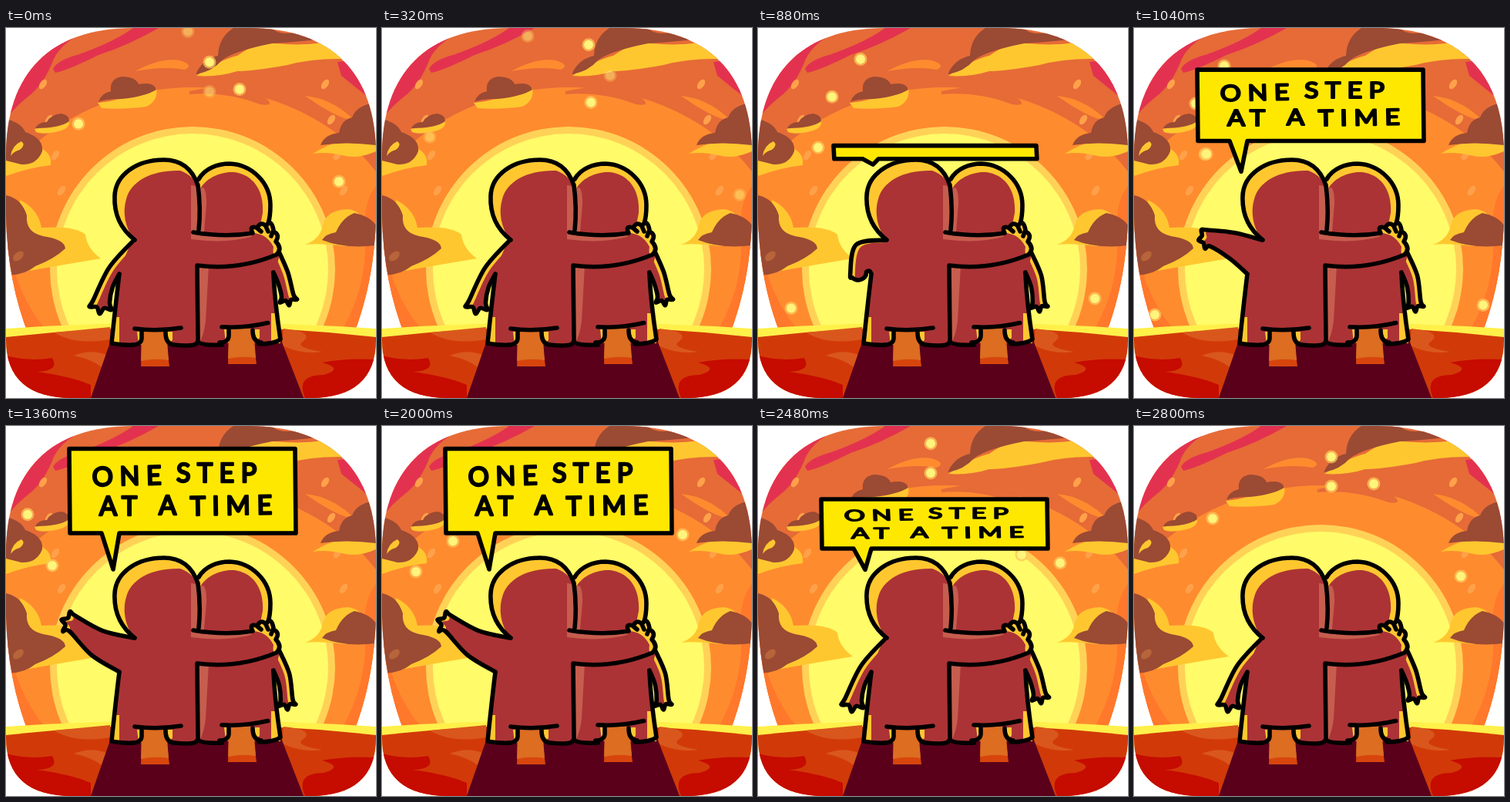
An HTML page that plays this animation: 480x480 px, repeating every 2.88 s.

```html
<!DOCTYPE html>
<html lang="en">
<head>
<meta charset="utf-8">
<title>One step at a time</title>
<style>
html, body { margin: 0; width: 100%; height: 100%; overflow: hidden; background: #fff; }
svg { display: block; width: 100vw; height: 100vh; }
.ink { fill: none; stroke: #000; stroke-width: 5.6; stroke-linecap: round; stroke-linejoin: round; }
.brown { fill: #9b4a33; }
.gold { fill: #ffc72f; }
.red { fill: #ab3335; }
.rose { fill: #c65d4e; }
.pink { fill: #e3324f; }
.coral { fill: #e66b37; }
.orange { fill: #ff8b2f; }
.seam { fill: none; stroke: #ab3335; stroke-width: 4; }
text { font: 34px Lato, "Open Sans", sans-serif; letter-spacing: 8.5px; stroke: #000; stroke-width: 2.6; stroke-linejoin: round; }
</style>
</head>
<body>
<svg viewBox="0 0 480 480">
  <defs>
    <clipPath id="dome"><path d="M0 165C0 58 58 0 165 0H315C422 0 480 58 480 165V245Q478 330 450 400H30Q2 330 0 245Z"/></clipPath>
    <clipPath id="floor"><path d="M0 370H480V405C480 455 450 480 395 480H85C30 480 0 455 0 405Z"/></clipPath>
  </defs>
  <g clip-path="url(#dome)">
    <path class="coral" d="M0 0H480V480H0Z"/>
    <ellipse class="orange" cx="242" cy="320" rx="285" ry="243"/>
    <path fill="#ff782b" d="M0 270Q12 345 52 392H0ZM480 205Q462 225 466 275Q468 335 436 392H480Z"/>
    <path class="pink" d="M0 0H112Q74 16 62 40Q50 72 30 88Q14 100 0 118ZM61 53Q66 42 95 34Q140 18 165 0H198Q160 22 120 35Q80 55 64 58ZM430 44Q455 40 480 60V98Q455 78 435 62Z"/>
    <path class="orange" d="M168 56Q200 38 225 42Q245 48 232 54Q205 49 168 56ZM388 88Q425 92 452 120Q430 118 388 88Z"/>
    <path class="coral" d="M238 82Q300 68 337 91Q350 102 330 99Q285 82 238 86Z"/>
    <g id="dots" fill="#ffa14a"></g>
    <circle cx="242" cy="313" r="185" fill="#ffd257"/>
    <circle cx="242" cy="313" r="176" fill="#fffb69"/>
    <g id="clouds">
      <path class="gold" d="M119 97Q150 94 195 78Q198 94 182 102Q150 106 124 104Z"/>
      <path class="brown" d="M120 96Q123 85 136 82Q134 66 150 63Q168 63 172 73Q192 69 195 80Q180 89 150 92Q128 92 120 96Z"/>
      <path class="gold" d="M37 131Q60 128 82 120Q84 130 68 134Q48 139 39 135Z"/>
      <path class="brown" d="M38 130Q42 122 53 122Q58 112 72 111Q82 113 82 121Q70 130 38 130Z"/>
      <path class="gold" d="M0 170Q30 170 47 157Q60 164 58 178Q30 181 0 192Z"/>
      <path class="brown" d="M0 118Q20 123 25 135Q49 143 47 160Q40 178 20 177L0 172Z"/>
      <path class="gold" d="M6 166Q8 152 20 147Q26 152 18 158Q10 160 6 166Z"/>
      <path class="gold" d="M18 223Q42 235 46 259Q90 256 103 268Q105 286 123 299Q75 307 24 316Z"/>
      <path class="brown" d="M0 217Q20 221 27 243Q25 265 48 270Q76 274 77 286Q62 300 38 309Q22 322 0 320Z"/>
      <ellipse cx="16" cy="296" rx="5" ry="8" transform="rotate(50 16 296)" fill="#b8643a"/>
      <path class="gold" d="M247 62Q280 40 300 36Q330 15 350 20Q400 25 445 12Q470 25 467 42Q410 36 365 48Q320 56 300 56Q275 64 247 62Z"/>
      <path class="brown" d="M247 58Q256 40 275 36Q276 12 295 0H345Q356 14 400 0L430 12Q380 18 345 20Q295 30 280 42Q268 56 247 60Z"/>
      <path class="gold" d="M398 163Q440 138 480 140V160Q455 171 436 165Q415 160 398 163Z"/>
      <path class="brown" d="M408 152Q413 138 432 136Q435 119 449 116Q454 101 480 96V152Q440 147 408 152Z"/>
      <path class="gold" d="M388 281Q408 274 411 255Q416 236 444 235Q462 238 464 253L440 283Q405 279 388 281Z"/>
      <path class="brown" d="M410 275Q415 267 428 265Q436 246 452 240Q472 244 480 256V282Q440 287 410 275Z"/>
    </g>
    <g id="stars"></g>
  </g>
  <g clip-path="url(#floor)">
    <path fill="#fff04a" d="M0 390Q240 374 480 390V480H0Z"/>
    <path fill="#d13a08" d="M0 401Q240 374 480 401V480H0Z"/>
    <path fill="#c60b00" d="M0 425Q30 433 60 428Q70 445 40 446Q85 452 110 463V480H0ZM480 430Q440 428 410 434Q440 442 412 450Q375 450 388 480H480Z"/>
    <path fill="#d9571d" d="M62 395Q90 412 135 404V388ZM360 390Q400 394 386 406Q372 414 410 420Q385 424 358 412ZM88 425Q110 416 130 424L124 440Q112 430 88 425Z"/>
    <path fill="#5a001b" d="M136 405L110 480H386L357 405Z"/>
  </g>
  <g id="right">
    <path class="gold" d="M250 198C258 182 275 176 290 176C318 177 343 200 343 230Q343 250 345 262L354 290L347 317L356 409H249Z"/>
    <path class="red" d="M252 208C262 192 282 186 296 187C320 190 335 210 333 240L330 255L354 290L347 317L350 370H344V409H249Z"/>
    <path class="rose" d="M252 208Q260 202 260 228L257 264H250ZM250 308H263L259 380Q256 402 250 409Z"/>
    <path class="ink" d="M250 196C258 182 275 176 290 176C318 177 343 200 343 230Q343 245 340 254M347 317Q348 350 356 404Q348 410 328 410"/>
  </g>
  <g id="armR"></g>
  <g id="left">
    <path class="gold" d="M166 275C148 260 140 240 141 218C142 190 170 171 205 171C228 171 242 184 251 206L249 411H138L147 319Z"/>
    <path class="red" d="M166 275C154 258 151 238 156 222C162 198 190 184 226 185Q246 192 250 212V411H147V375H141L147 319Z"/>
    <path class="rose" d="M240 204Q250 204 251 216L249 264H240Z"/>
    <path class="ink" d="M167 275C148 260 140 240 141 218C142 190 170 171 205 171C228 171 242 184 249 204Q253 235 250 262M147 319Q142 360 137 409Q155 412 166 411M218 411Q236 413 244 411Q250 409 249 402L248 309M250 408Q256 412 280 411"/>
  </g>
  <g id="legs"></g>
  <g id="hug">
    <path class="red" d="M235 265Q285 271 322 264L330 260L346 274L354 290Q300 315 236 308Z"/>
    <path class="rose" d="M240 263Q285 272 320 265L318 271Q285 280 240 274Z"/>
    <path class="gold" d="M319 266Q315 256 325 259Q330 251 337 256Q344 247 346 262Q356 268 351 277Q358 286 351 294Q345 296 347 284Q338 266 319 266Z"/>
    <path class="ink" d="M243 265Q285 272 320 266Q315 256 325 259L331 264M326 259Q331 250 337 257L340 264M338 256Q344 247 347 262L344 270M347 264Q356 268 350 277Q359 286 351 294Q301 315 248 308"/>
  </g>
  <g id="armL"></g>
  <g id="bubble">
    <path class="ink" style="fill:#ffe800" vector-effect="non-scaling-stroke" d="M82 29.500H375L376 139H147L139 186L124 139H83Z"/>
    <g id="words">
      <text x="112" y="78" transform="rotate(-1.500 112 78)">ONE</text>
      <text x="221" y="73">STEP</text>
      <text x="121" y="116">AT</text>
      <text x="198" y="115">A</text>
      <text x="239" y="116" transform="rotate(-1 239 116)">TIME</text>
    </g>
  </g>
</svg>
<script>
const STEP = 80, COUNT = 36;
const $ = id => document.getElementById(id);
const clamp = v => Math.max(0, Math.min(1, v));
const ease = t => (t = clamp(t), t * t * (3 - 2 * t));
const mix = (a, b, f) => a.map((v, i) => v + (b[i] - v) * f);

function add(parent, tag, attrs) {
  const el = document.createElementNS('http://www.w3.org/2000/svg', tag);
  for (const k in attrs) el.setAttribute(k, attrs[k]);
  return parent.appendChild(el);
}

// Smooth open curve through points
function curve(pts) {
  const at = i => pts[Math.max(0, Math.min(pts.length - 1, i))];
  let d = `M${pts[0]}`;
  for (let i = 0; i < pts.length - 1; i++) {
    const a = at(i - 1), b = at(i), c = at(i + 1), e = at(i + 2);
    d += `C${b[0] + (c[0] - a[0]) / 6} ${b[1] + (c[1] - a[1]) / 6} ` +
         `${c[0] - (e[0] - b[0]) / 6} ${c[1] - (e[1] - b[1]) / 6} ${c}`;
  }
  return d;
}

// Middle of a-b, pushed sideways by a share of its length
const bend = (a, b, k) => [(a[0] + b[0] - k * 2 * (b[1] - a[1])) / 2, (a[1] + b[1] + k * 2 * (b[0] - a[0])) / 2];

// Outline from shoulder around three fingers to the armpit
function armPoints(top, pit, side, palm, [x, y, deg, bow, finger]) {
  const hand = [];
  for (let i = 0; i <= 6; i++) {
    const a = (deg + side * (80 - i * 80 / 3)) * Math.PI / 180;
    const r = palm + (i % 2 ? finger : 0);
    hand.push([x + r * Math.cos(a), y + r * Math.sin(a)]);
  }
  return [top, bend(top, hand[0], bow * side), ...hand, bend(hand[6], pit, -bow * side), pit];
}

// Gold rim, red inside, black outline
function arm(id, top, pit, side, palm) {
  const g = $(id);
  const clip = add(add(g, 'clipPath', { id: id + 'Clip' }), 'path', {});
  const rim = add(g, 'path', { class: 'gold' });
  const inside = add(add(g, 'g', { 'clip-path': `url(#${id}Clip)` }), 'path',
    { class: 'red', transform: `translate(${6 * side} 3)` });
  add(g, 'path', { class: 'seam', d: `M${top}L${pit}` });
  const line = add(g, 'path', { class: 'ink' });
  return pose => {
    const d = curve(armPoints(top, pit, side, palm, pose));
    for (const el of [clip, rim, inside, line]) el.setAttribute('d', d);
  };
}
const drawLeft = arm('armL', [166, 275], [147, 319], 1, 11);
const drawRight = arm('armR', [354, 290], [347, 317], -1, 8);

// hand x, hand y, direction, bow, finger length
const hang = [124, 353, 98, .07, 7], fold = [130, 316, 80, .35, 0], wave = [88, 257, 200, -.07, 6];
const outside = [365, 346, 80, .04, 6], inside = [364, 354, 85, .07, 6];

// Gap between the feet, with its light on the path
for (const [x, y, turn] of [[178, 391, 0], [291, 388, -4]]) {
  const g = add($('legs'), 'g', { transform: `translate(${x} ${y})` });
  add(g, 'path', { class: 'gold', d: 'M-8 3H38V14L30 20H-6Z' });
  add(g, 'path', { fill: '#d8450c', d: 'M-1 2H28L34 48H-3Z' });
  add(g, 'path', { fill: '#dc6d21', d: 'M-2 2H30L33 40Q15 37 -3 41Z' });
  add(g, 'path', { class: 'ink', d: 'M-2 4V12Q-3 20 -14 20M29 4Q29 19 40 20' });
  add(g, 'path', { class: 'ink', transform: `rotate(${turn})`, d: 'M-11 -1Q17 3 49 -2' });
}

for (let i = 0; i < 8; i++) {
  const cx = i % 2 ? 410 + i * 4 : 48 + i * 4, cy = 73 + (i >> 1) * 46;
  add($('dots'), 'ellipse', { cx, cy, rx: 4, ry: 7, transform: `rotate(35 ${cx} ${cy})` });
}

// Brightest step and place there; even ones drift right, odd ones left
const stars = [
  [35, 256, 40], [38, 287, 88], [31, 224, 61], [28, 366, 154], [35, 424, 195], [9, 149, 32],
  [21, 60, 132], [10, 104, 85], [25, 44, 189], [35, 102, 120], [5, 276, 26], [17, 60, 181],
  [11, 437, 351], [13, 27, 372], [11, 78, 155]
].map(([peak, x, y], i) => {
  const el = add($('stars'), 'g', {});
  add(el, 'circle', { r: 8.5, fill: '#ffc45a', opacity: .75 });
  add(el, 'circle', { r: 6, fill: '#fff47c' });
  return n => {
    const age = (n - peak + COUNT * 1.5) % COUNT - COUNT / 2;
    el.setAttribute('opacity', clamp((6 - Math.abs(age)) / 2));
    el.setAttribute('transform', `translate(${x + (i % 2 ? -8 : 8) * age} ${y + 4.3 * age})`);
  };
});

function draw(n) {
  const raised = mix(mix(hang, fold, ease((n - 8) / 3)), wave, ease((n - 11) / 3));
  drawLeft(mix(raised, hang, ease((n - 28) / 3)));
  drawRight(mix(outside, inside, ease((n - 7) / 4) - ease((n - 28) / 3)));

  // The bubble unfolds upwards and drops shut
  const open = n < 20 ? ease((n - 10) / 4) : 1 - (Math.max(0, n - 29) / 3.1) ** 2;
  const tip = 187 - 40 * Math.max(0, .4 - open);
  const wide = Math.min(1, .86 + .24 * open);
  $('bubble').setAttribute('visibility', open > 0 ? 'visible' : 'hidden');
  $('words').setAttribute('opacity', open > .3 ? 1 : 0);
  $('bubble').setAttribute('transform', `translate(238 ${tip}) scale(${wide} ${Math.max(open, .01)}) translate(-238 -187)`);

  for (const move of stars) move(n);
}

const start = performance.now();
function tick() {
  draw(Math.floor((performance.now() - start) / STEP) % COUNT);
  requestAnimationFrame(tick);
}
tick();
</script>
</body>
</html>
```
